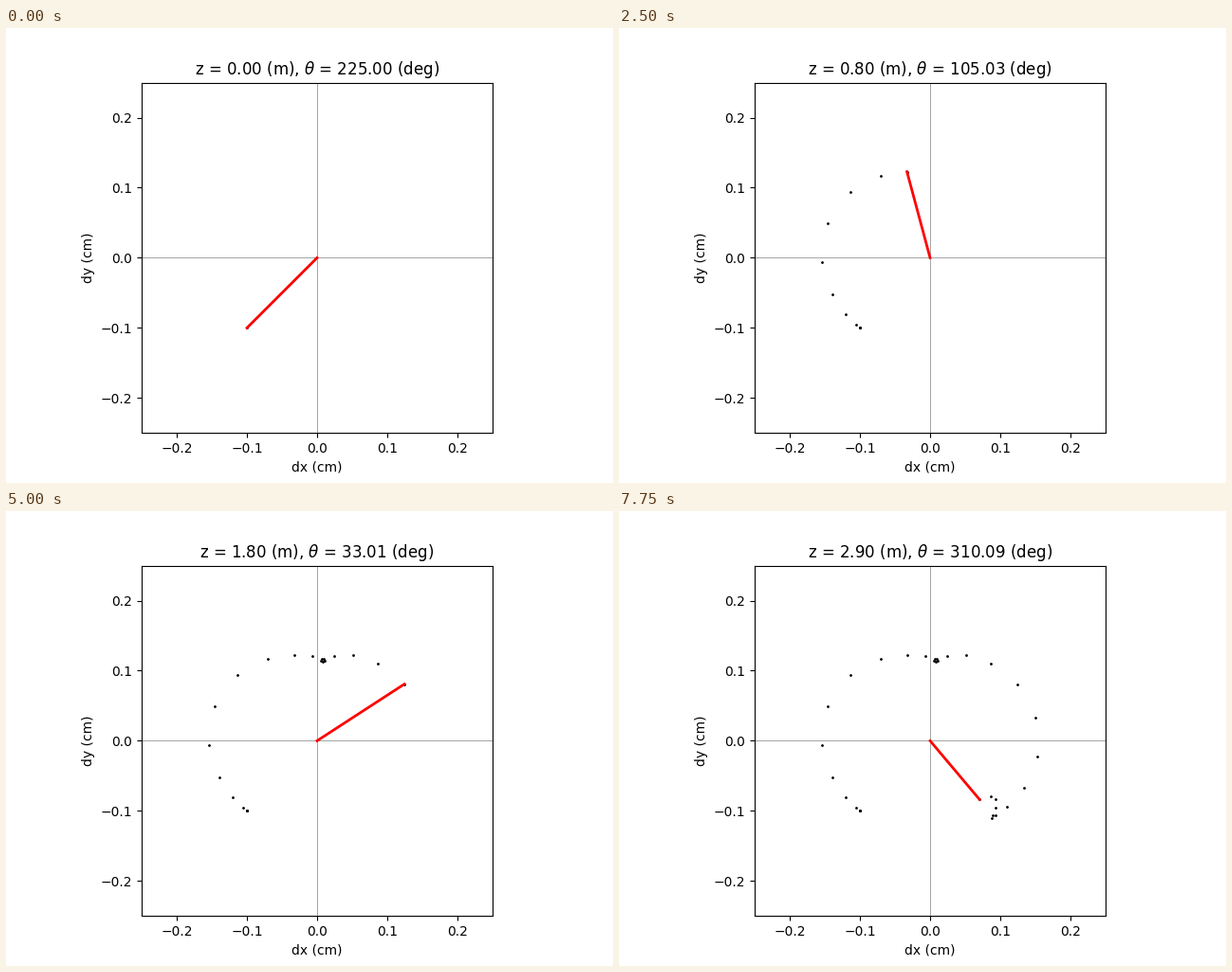
Animation, 640 px wide and 480 px high, one loop 8 s. Source, as a matplotlib script:

```python
import numpy as np
import matplotlib.pyplot as plt
from matplotlib.animation import FuncAnimation

FRAMES = 32
HOLD = 2       # extra frames spent at the start position
STEP = 0.1     # metres per frame
LIMIT = 0.25

# Key poses: z (m), angle (deg), radius (cm)
keys = np.array([
    (0.0, 225.00, 0.1414),
    (0.3, 200.55, 0.1488),
    (0.5, 161.36, 0.1546),
    (0.7, 121.00, 0.1359),
    (1.0, 86.53, 0.1172),
    (1.4, 85.56, 0.1172),
    (1.8, 33.01, 0.1485),
    (2.0, -8.40, 0.1546),
    (2.2, -40.52, 0.1447),
    (2.5, -50.00, 0.1391),
    (2.8, -42.40, 0.1171),
    (2.9, -49.91, 0.1097),
])


def spline(knots, values, at):
    """Natural cubic spline, built from cubes of distances plus a line."""
    n = len(knots)
    line = np.column_stack([np.ones(n), knots])
    cubes = np.abs(knots[:, None] - knots) ** 3
    system = np.block([[cubes, line], [line.T, np.zeros((2, 2))]])
    weights = np.linalg.solve(system, np.vstack([values, np.zeros((2, 2))]))
    basis = np.column_stack([np.abs(at[:, None] - knots) ** 3,
                             np.ones(len(at)), at])
    return basis @ weights


# Mirror the keys about z = 0 so that the motion starts from rest.
mirrored = np.vstack([keys[:0:-1] * (-1, 1, 1), keys])
depth = STEP * np.maximum(np.arange(FRAMES) - HOLD, 0)
angle, radius = spline(mirrored[:, 0], mirrored[:, 1:], depth).T
xs = radius * np.cos(np.radians(angle))
ys = radius * np.sin(np.radians(angle))

fig, ax = plt.subplots(figsize=(6.4, 4.8), dpi=100)
ax.set_aspect("equal")
ax.set_xlim(-LIMIT, LIMIT)
ax.set_ylim(-LIMIT, LIMIT)
ticks = np.arange(-2, 3) / 10
ax.set_xticks(ticks)
ax.set_yticks(ticks)
ax.set_xlabel("dx (cm)")
ax.set_ylabel("dy (cm)")
ax.axhline(0, color="gray", lw=0.5)
ax.axvline(0, color="gray", lw=0.5)

trail, = ax.plot([], [], "k.", ms=2, zorder=2)
arm, = ax.plot([], [], color="red", lw=2, zorder=2.1)
title = ax.set_title("")


def draw(frame):
    trail.set_data(xs[:frame + 1], ys[:frame + 1])
    arm.set_data([0, xs[frame]], [0, ys[frame]])
    title.set_text(rf"z = {depth[frame]:.2f} (m), "
                   rf"$\theta$ = {angle[frame] % 360:.2f} (deg)")
    return trail, arm, title


def reset():
    return draw(0)


anim = FuncAnimation(fig, draw, frames=FRAMES, init_func=reset,
                     interval=250, repeat=True, repeat_delay=0)
plt.show()
```
